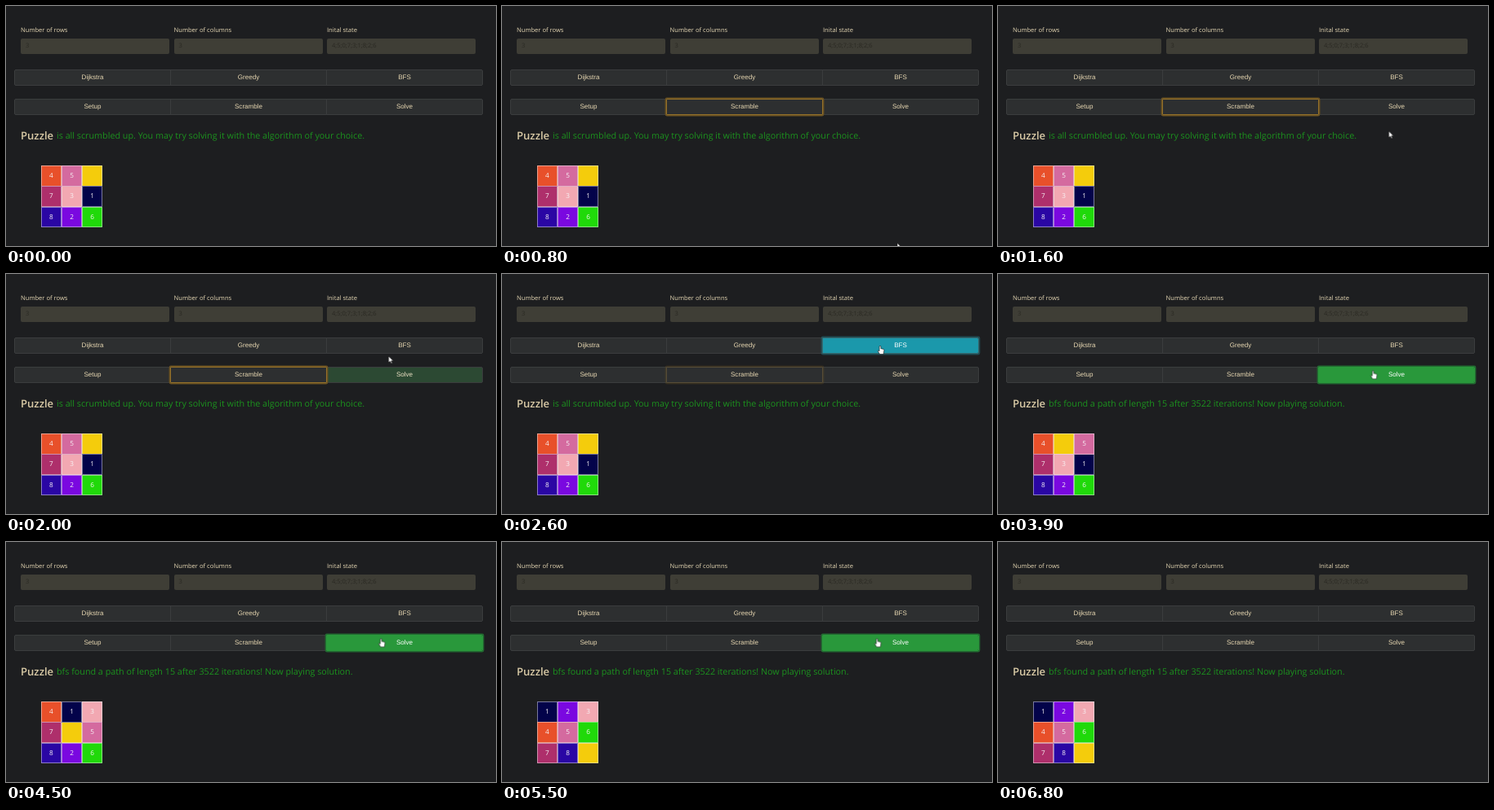
An HTML page that plays this animation: 600x295 px, repeating every 7.1 s.

```html
<!DOCTYPE html>
<html lang="en">
<head>
<meta charset="utf-8">
<title>Sliding puzzle solver</title>
<style>
  html, body { margin: 0; width: 100%; height: 100%; overflow: hidden; background: #1d1e20; }
  #stage {
    position: relative; width: 600px; height: 295px; overflow: hidden;
    font: 7.6px/20px "Open Sans", "Noto Sans", sans-serif; color: #e3d5b2;
    text-rendering: geometricPrecision;
  }
  #stage * { box-sizing: border-box; }
  #stage > * { position: absolute; white-space: nowrap; }

  .field { top: 20px; width: 182px; }
  .field div {
    height: 18.5px; padding-left: 6px; border-radius: 2px;
    font-size: 7.5px; line-height: 19px; background: #3f3e36; color: #2a2923;
  }

  .btn, .ring { width: 192px; height: 20px; }
  .btn {
    border: 1px solid #3b3d3e; background: #2d2f30;
    font: 8.05px/18px "Liberation Sans", Arial, sans-serif; text-align: center; color: #e8d8b2;
  }
  .row1 { top: 78px; }
  .row2 { top: 114px; }
  .c1 { left: 10px; border-radius: 2px 0 0 2px; }
  .c2 { left: 201px; }
  .c3 { left: 392px; border-radius: 0 2px 2px 0; }
  .ring {
    border: 1px solid var(--ring); border-radius: 1px;
    box-shadow: 0 0 0 1.4px var(--glow); opacity: 0;
  }

  .title { left: 18px; top: 149px; font-size: 13.1px; font-weight: 600; color: #d9caa6; }
  .msg { left: 62px; top: 149.9px; font-size: 10.76px; color: #1c921e; }

  #board { left: 42.6px; top: 196.4px; }
  .tile {
    position: absolute; width: 25.6px; height: 25.6px; border: 1px solid rgba(240, 240, 240, .5);
    font-size: 8.2px; line-height: 24px; text-align: center; color: #f6f2f3;
  }

  #cursor { left: 0; top: 0; width: 12px; height: 14px; overflow: visible; }
  #cursor path { fill: #fff; stroke: #111; stroke-width: .6; stroke-linejoin: round; }

  .anim { animation: 7100ms linear infinite; }
  #scramble-ring { animation-name: scramble-ring; }
  #bfs-ring { animation-name: bfs-ring; }
  #solve-ring { animation-name: solve-ring; }
  #bfs { animation-name: bfs-hover; }
  #solve { animation-name: solve-hover; }
  #cursor { animation-name: travel; }
  #arrow { animation-name: arrow; animation-timing-function: step-end; }
  #hand { animation-name: hand; animation-timing-function: step-end; }
  #before { animation-name: before; animation-timing-function: step-end; }
  #after { animation-name: after; animation-timing-function: step-end; }

  @keyframes scramble-ring {
    0%, .7% { opacity: 0; } 2.5%, 35.2% { opacity: 1; } 37.3%, 100% { opacity: 0; }
  }
  @keyframes bfs-ring {
    0%, 35.2% { opacity: 0; } 37.3%, 52.8% { opacity: 1; } 54.9%, 100% { opacity: 0; }
  }
  @keyframes solve-ring {
    0%, 52.8% { opacity: 0; } 54.9%, 90% { opacity: 1; } 92.1%, 100% { opacity: 0; }
  }
  @keyframes bfs-hover {
    0%, 29.3% { background: #2d2f30; color: #e8d8b2; }
    31.4%, 42.8% { background: #1b98ab; color: #fff; }
    44.9%, 100% { background: #2d2f30; color: #e8d8b2; }
  }
  @keyframes solve-hover {
    0%, 23.8% { background: #2d2f30; color: #e8d8b2; }
    25.9%, 26.6% { background: #29983b; color: #fff; }
    28.7%, 44.4% { background: #2d2f30; color: #e8d8b2; }
    46.5%, 90% { background: #29983b; color: #fff; }
    92.1%, 100% { background: #2d2f30; color: #e8d8b2; }
  }
  @keyframes travel {
    0%, 8.45% { transform: translate(484px, 297px); }
    11.27% { transform: translate(484px, 291.5px); }
    19.7%, 21.8% { transform: translate(480px, 165px); }
    23.8% { transform: translate(476px, 135px); }
    26.6% { transform: translate(471px, 112px); }
    28.17% { transform: translate(468.5px, 101px); }
    32.4%, 40.8% { transform: translate(463px, 88px); }
    42.8% { transform: translate(461px, 99px); }
    45.07% { transform: translate(459.2px, 117px); }
    47.9%, 100% { transform: translate(459.2px, 118.5px); }
  }
  @keyframes arrow {
    0% { opacity: 1; } 23.8% { opacity: 0; } 26.6% { opacity: 1; } 29.3% { opacity: 0; }
    42.8% { opacity: 1; } 44.4%, 100% { opacity: 0; }
  }
  @keyframes hand {
    0% { opacity: 0; } 23.8% { opacity: 1; } 26.6% { opacity: 0; } 29.3% { opacity: 1; }
    42.8% { opacity: 0; } 44.4% { opacity: 1; } 90%, 100% { opacity: 0; }
  }
  @keyframes before { 0% { opacity: 1; } 53.8%, 100% { opacity: 0; } }
  @keyframes after { 0% { opacity: 0; } 53.8%, 100% { opacity: 1; } }
</style>
</head>
<body>
<div id="stage">
  <div class="field" style="left:18px">Number of rows<div>3</div></div>
  <div class="field" style="left:205.5px">Number of columns<div>3</div></div>
  <div class="field" style="left:393px">Inital state<div>4;5;0;7;3;1;8;2;6</div></div>

  <div class="btn row1 c1">Dijkstra</div>
  <div class="btn row1 c2">Greedy</div>
  <div class="btn row1 c3 anim" id="bfs">BFS</div>
  <div class="btn row2 c1">Setup</div>
  <div class="btn row2 c2">Scramble</div>
  <div class="btn row2 c3 anim" id="solve">Solve</div>
  <div class="ring row2 c2 anim" id="scramble-ring" style="--ring:#94712a;--glow:#6b5222"></div>
  <div class="ring row1 c3 anim" id="bfs-ring" style="--ring:#35808a;--glow:#24606a"></div>
  <div class="ring row2 c3 anim" id="solve-ring" style="--ring:#29983b;--glow:#226b31"></div>

  <div class="title">Puzzle</div>
  <div class="msg anim" id="before">is all scrumbled up. You may try solving it with the algorithm of your choice.</div>
  <div class="msg anim" id="after">bfs found a path of length 15 after 3522 iterations! Now playing solution.</div>

  <div id="board"></div>

  <svg id="cursor" class="anim">
    <path id="arrow" class="anim" d="M0 0V8L1.9 6.3 3.1 9 4.4 8.4 3.2 5.8H5.7Z"/>
    <path id="hand" class="anim" d="M-.9 .8Q0-.5 .9 .8V3.7L4.2 4.4Q5 4.7 4.9 5.8L4.1 10.6H-.4L-2.8 6.7Q-2.8 5.3-.9 6.7Z"/>
  </svg>
</div>
<script>
  const LOOP = 7100, FIRST_MOVE = 3820, MOVE_GAP = 125, PITCH = 25.1;
  const START = [4, 5, 0, 7, 3, 1, 8, 2, 6];
  const BLANK_PATH = "LDRULDDLUURDRD";
  const STEP = { L: -1, R: 1, U: -3, D: 3 };
  const COLORS = ["#f4cc0c", "#03034a", "#7a08e0", "#f2a8b2", "#e8502a", "#d46a9f", "#20d90a", "#ae2f6b", "#2a06a4"];

  // Every board state from the scrambled one to the solved one
  const states = [START];
  for (const dir of BLANK_PATH) {
    const next = [...states.at(-1)];
    const from = next.indexOf(0), to = from + STEP[dir];
    [next[from], next[to]] = [next[to], 0];
    states.push(next);
  }

  const tiles = COLORS.map((color, n) => {
    const tile = document.createElement("div");
    tile.className = "tile";
    tile.style.background = color;
    tile.textContent = n || "";
    document.getElementById("board").append(tile);
    return tile;
  });

  let shown = -1;
  function draw(now) {
    const t = now % LOOP;
    const moves = Math.floor((t - FIRST_MOVE) / MOVE_GAP) + 1;
    const k = Math.max(0, Math.min(BLANK_PATH.length, moves));
    if (k !== shown) {
      shown = k;
      states[k].forEach((n, i) => {
        tiles[n].style.left = (i % 3) * PITCH + "px";
        tiles[n].style.top = Math.floor(i / 3) * PITCH + "px";
      });
    }
  }

  // Share the clock of the CSS animations
  const clock = document.getElementById("cursor").getAnimations()[0];
  function tick(now) {
    draw(clock?.currentTime ?? now);
    requestAnimationFrame(tick);
  }
  draw(0);
  requestAnimationFrame(tick);
</script>
</body>
</html>
```
